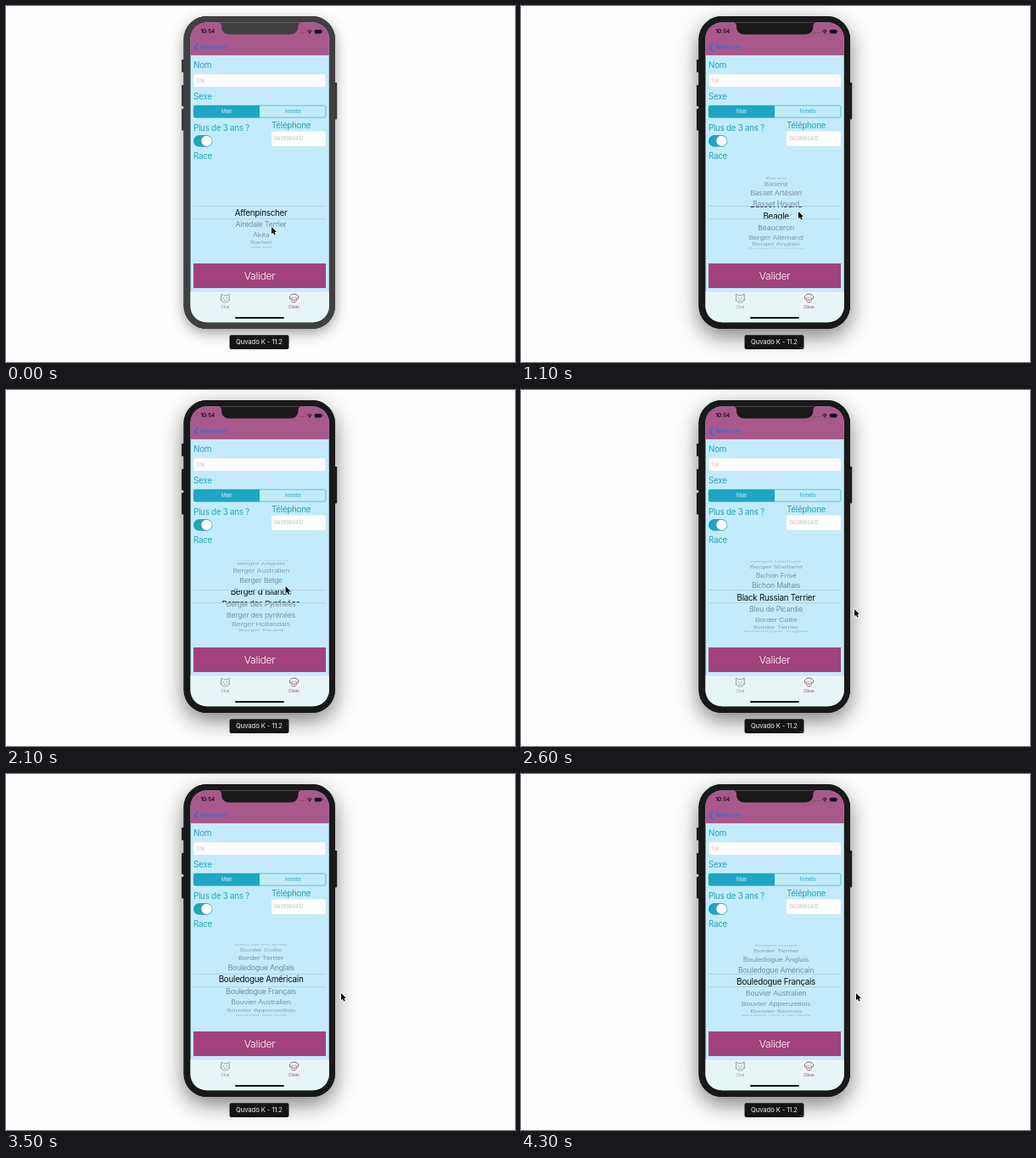
Write an HTML page with a canvas that moves like this. It is 600 by 419 pixels and loops after 4.4 s.

```html
<!DOCTYPE html>
<html lang="fr">
<head>
<meta charset="utf-8">
<title>Picker</title>
<style>
html, body { margin: 0; width: 100%; height: 100%; overflow: hidden; background: #fefefe; }
canvas { display: block; width: 600px; height: 419px; }
</style>
</head>
<body>
<canvas id="stage"></canvas>
<script>
const W = 600, H = 419, LOOP = 4400, STEP = 100;
const TEAL = '#1fa5c4', PLUM = '#a1417d', SKY = '#c3ebfc';
const FONT = 'Inter, "Liberation Sans", sans-serif';
const BREEDS = ['Affenpinscher', 'Airedale Terrier', 'Akita', 'Barbet', 'Barzoï', 'Basenji',
  'Basset Artésien', 'Basset Hound', 'Beagle', 'Beauceron', 'Berger Allemand', 'Berger Anglais',
  'Berger Australien', 'Berger Belge', "Berger d'Islande", 'Berger des Pyrénées',
  'Berger des pyrénées', 'Berger Hollandais', 'Berger Picard', 'Berger Polonais',
  'Berger Shetland', 'Bichon Frisé', 'Bichon Maltais', 'Black Russian Terrier',
  'Bleu de Picardie', 'Border Collie', 'Border Terrier', 'Bouledogue Anglais',
  'Bouledogue Américain', 'Bouledogue Français', 'Bouvier Australien', 'Bouvier Appenzellois',
  'Bouvier Bernois', 'Bouvier des Flandres'];

const canvas = document.getElementById('stage');
const dpr = window.devicePixelRatio || 1;
canvas.width = W * dpr;
canvas.height = H * dpr;
const c = canvas.getContext('2d');

function box(x, y, w, h, r, fill, stroke, line = 0.7) {
  c.beginPath();
  c.roundRect(x, y, w, h, r);
  if (fill) { c.fillStyle = fill; c.fill(); }
  if (stroke) { c.strokeStyle = stroke; c.lineWidth = line; c.stroke(); }
}

// y is the middle of the capitals
function text(str, x, y, size, color, { align = 'left', weight = 400, track = -0.026 } = {}) {
  c.font = `${weight} ${size}px ${FONT}`;
  c.letterSpacing = `${track * size}px`;
  c.textAlign = align;
  c.fillStyle = color;
  c.fillText(str, x, y + size * 0.364);
}

function path(points, close) {
  c.beginPath();
  points.forEach(([x, y], i) => i ? c.lineTo(x, y) : c.moveTo(x, y));
  if (close) c.closePath();
}

function dot(x, y, r, fill) {
  c.beginPath();
  c.arc(x, y, r, 0, Math.PI * 2);
  c.fillStyle = fill;
  c.fill();
}

// Wheel position in rows: drag, fling, grab, drag, fling
const fling = (from, to, s) => to - (to - from) * Math.exp(-1.63 * s - 0.25 * s * s);
function drag(from, to, t, t0, t1) {
  const k = Math.min(1, Math.max(0, (t - t0) / (t1 - t0)));
  return from + (to - from) * k * k;
}
function wheel(t) {
  if (t < 700) return drag(0, 1.54, t, 200, 700);
  if (t < 1600) return fling(1.54, 13.9, (t - 700) / 1000);
  if (t < 2100) return drag(fling(1.54, 13.9, 0.9), 14.38, t, 1650, 2100);
  return fling(14.38, 29, (t - 2100) / 1000);
}

const MOVES = [[0, 313, 260], [200, 313, 260], [400, 317, 261], [700, 322.5, 244],
  [800, 324, 234], [950, 326, 230], [1400, 329, 266], [1650, 329, 266], [1900, 329, 256],
  [2100, 329.5, 231], [2200, 333, 222], [2600, 393, 258], [2800, 395, 258], [LOOP, 395, 258]];
function pointer(t) {
  const i = MOVES.findIndex(m => m[0] > t);
  const a = MOVES[i - 1], b = MOVES[i];
  const k = (t - a[0]) / (b[0] - a[0]);
  return [a[1] + (b[1] - a[1]) * k, a[2] + (b[2] - a[2]) * k];
}

function shadow(active) {
  c.save();
  c.shadowColor = active ? 'rgba(0,0,0,0.5)' : 'rgba(0,0,0,0.38)';
  c.shadowBlur = (active ? 26 : 16) * dpr;
  c.shadowOffsetY = (active ? 9 : 5) * dpr;
  box(209.5, 12, 178.5, 368, 27, '#222');
  c.restore();
}

function body(active) {
  const shell = active ? '#191919' : '#404041';
  const key = active ? '#1c1c1c' : '#38383a';
  shadow(active);
  [[207, 63, 15], [207, 93, 25], [207, 121, 25.5], [386.5, 90, 43.5]]
    .forEach(([x, y, h]) => box(x, y, 3.7, h, 1, key));
  box(209.5, 12, 178.5, 368, 27, shell);
}

function notch(active) {
  c.beginPath();
  c.moveTo(250.5, 19);
  c.lineTo(250.5, 19.6);
  c.quadraticCurveTo(253.8, 19.8, 253.8, 23);
  c.quadraticCurveTo(254, 33.6, 264, 33.6);
  c.lineTo(334.5, 33.6);
  c.quadraticCurveTo(344.4, 33.6, 344.6, 23);
  c.quadraticCurveTo(344.6, 19.8, 348, 19.6);
  c.lineTo(348, 19);
  c.fillStyle = active ? '#191919' : '#404041';
  c.fill();
}

function statusBar() {
  text('10:54', 229.4, 30, 6.4, '#111', { weight: 600, track: -0.01 });
  for (let i = 0; i < 4; i++) dot(346.3 + i * 1.9, 31.6, 0.5, 'rgba(20,10,20,0.5)');
  c.strokeStyle = '#111';
  c.lineWidth = 1;
  [1.8, 3.6].forEach(r => {
    c.beginPath();
    c.arc(358, 32.2, r, -Math.PI * 0.77, -Math.PI * 0.23);
    c.stroke();
  });
  dot(358, 32, 0.8, '#111');
  box(364, 28, 8.2, 4.2, 1.2, '#111', '#332030', 0.5);
  box(372.8, 29.2, 0.7, 1.8, 0.3, '#332030');
}

function navBar() {
  c.fillStyle = '#a9588c';
  c.fillRect(217, 19, 165, 39);
  path([[226.3, 44.4], [222.2, 48.7], [226.3, 53]]);
  c.strokeStyle = '#2a67e2';
  c.lineWidth = 1.5;
  c.stroke();
  text('Welcome', 229, 48.7, 7.1, '#3b66d4', { track: -0.02, weight: 500 });
}

function form() {
  text('Nom', 221, 69.7, 9.8, TEAL);
  box(221, 80, 156, 15.6, 1.8, '#fff', '#cfdde3', 0.5);
  text('Tok', 224, 87.9, 5.9, '#c4c4c8');

  text('Sexe', 221, 106.3, 9.8, TEAL);
  box(221.3, 117.2, 155.6, 14, 1.8, null, TEAL, 0.6);
  box(221, 117, 78, 14.4, [1.8, 0, 0, 1.8], TEAL);
  text('Male', 260, 124.3, 5.5, '#d9f2fa', { align: 'center' });
  text('Femelle', 338, 124.3, 5.5, TEAL, { align: 'center' });

  text('Plus de 3 ans ?', 221, 143.6, 9.8, TEAL);
  box(221, 152, 22.4, 13.8, 6.9, TEAL);
  dot(236.5, 158.9, 6.2, '#fff');

  text('Téléphone', 313, 140.8, 9.8, TEAL);
  box(313, 147.3, 64, 17.8, 1.8, '#fff', '#dbe8ee', 0.4);
  text('0639980412', 316, 156.2, 5.9, '#bfbfc4', { track: -0.015 });

  text('Race', 221, 176.5, 9.8, TEAL);
}

const MID = 243.1, TOP = 235.5, END = 250.5;
function rows(pos, inBand) {
  c.save();
  c.beginPath();
  if (inBand) c.rect(218, TOP, 163, END - TOP);
  else {
    c.rect(218, 196, 163, TOP - 196);
    c.rect(218, END, 163, 292 - END);
  }
  c.clip();
  BREEDS.forEach((name, i) => {
    const d = i - pos, a = d * 0.33;
    if (Math.abs(a) > 1.5 || (inBand && Math.abs(d) > 1.3)) return;
    c.save();
    c.translate(300.6, MID + 42.5 * Math.sin(a));
    c.scale(inBand ? 1 : 0.9 - 0.008 * Math.abs(d), Math.cos(a) * (inBand ? 1 : 0.9));
    const alpha = 0.54 * Math.pow(Math.cos(a), 0.45);
    text(name, 0, 0, 9.8, inBand ? '#0c1012' : `rgba(50,58,64,${alpha})`, { align: 'center' });
    c.restore();
  });
  c.restore();
}

function picker(pos) {
  rows(pos, false);
  rows(pos, true);
  c.fillStyle = '#a3c6d4';
  c.fillRect(221, TOP - 0.3, 156, 0.6);
  c.fillRect(221, END - 0.3, 156, 0.6);
}

function catIcon() {
  c.strokeStyle = '#858c8f';
  c.lineWidth = 0.8;
  c.lineJoin = 'round';
  c.beginPath();
  c.moveTo(253.7, 339);
  c.lineTo(256.7, 340.7);
  c.lineTo(260.1, 340.7);
  c.lineTo(263.1, 339);
  c.lineTo(263.3, 344.5);
  c.quadraticCurveTo(263, 349, 258.4, 349);
  c.quadraticCurveTo(253.8, 349, 253.5, 344.5);
  c.closePath();
  c.stroke();
  dot(256.4, 344, 0.7, '#858c8f');
  dot(260.4, 344, 0.7, '#858c8f');
  path([[256.6, 347], [258.4, 346.1], [260.2, 347]]);
  c.stroke();
  path([[252.5, 345.8], [254.6, 346]]);
  c.stroke();
  path([[264.3, 345.8], [262.2, 346]]);
  c.stroke();
}

function dogIcon() {
  c.strokeStyle = PLUM;
  c.lineWidth = 0.9;
  c.beginPath();
  c.moveTo(336.8, 339.6);
  c.quadraticCurveTo(339.5, 338.3, 342.2, 339.6);
  c.quadraticCurveTo(345.4, 341.5, 344.8, 344);
  c.quadraticCurveTo(343.8, 345.6, 342.3, 344.3);
  c.quadraticCurveTo(342.5, 348.8, 339.5, 348.9);
  c.quadraticCurveTo(336.5, 348.8, 336.7, 344.3);
  c.quadraticCurveTo(335.2, 345.6, 334.2, 344);
  c.quadraticCurveTo(333.6, 341.5, 336.8, 339.6);
  c.stroke();
  dot(338.1, 343, 0.6, PLUM);
  dot(340.9, 343, 0.6, PLUM);
  path([[338, 345.4], [341, 345.4], [339.5, 347]], true);
  c.fillStyle = PLUM;
  c.fill();
}

function footer() {
  c.fillStyle = PLUM;
  c.fillRect(221, 303, 156, 29);
  text('Valider', 299, 317.8, 12.2, '#fff', { align: 'center', weight: 300 });
  c.fillStyle = '#e8f5f6';
  c.fillRect(217, 336, 165, 37);
  c.fillStyle = '#c3dce2';
  c.fillRect(217, 335.8, 165, 0.4);
  catIcon();
  dogIcon();
  text('Chat', 258.5, 353.9, 4.4, '#858c8f', { align: 'center', track: 0.01 });
  text('Chien', 339.5, 353.9, 4.4, PLUM, { align: 'center', track: 0.01, weight: 500 });
  box(270, 366, 58, 2.1, 1, '#0a0a0a');
}

function caption() {
  box(263.5, 387.3, 70, 16.6, 2.2, '#141414');
  text('Quvado K - 11.2', 298.5, 395.7, 7.6, '#f4f4f4', { align: 'center', track: -0.01 });
}

function cursor([x, y]) {
  c.save();
  c.translate(x, y);
  path([[0, 0], [0, 8.2], [1.9, 6.5], [3.2, 9.4], [4.7, 8.7], [3.4, 5.9], [5.9, 5.8]], true);
  c.lineJoin = 'round';
  c.strokeStyle = '#fff';
  c.lineWidth = 1.2;
  c.stroke();
  c.fillStyle = '#000';
  c.fill();
  c.restore();
}

function draw(t) {
  const active = t >= 300;
  c.setTransform(dpr, 0, 0, dpr, 0, 0);
  c.fillStyle = '#fefefe';
  c.fillRect(0, 0, W, H);
  body(active);
  c.save();
  c.beginPath();
  c.roundRect(217.5, 19.5, 163.3, 352.7, 19);
  c.clip();
  c.fillStyle = SKY;
  c.fillRect(217, 19, 165, 354);
  navBar();
  statusBar();
  form();
  picker(wheel(t));
  footer();
  notch(active);
  c.restore();
  caption();
  cursor(pointer(t));
}

const start = performance.now();
let last = -1;
function tick() {
  const t = Math.floor(((performance.now() - start) % LOOP) / STEP) * STEP;
  if (t !== last) draw(last = t);
  requestAnimationFrame(tick);
}
tick();
</script>
</body>
</html>
```
